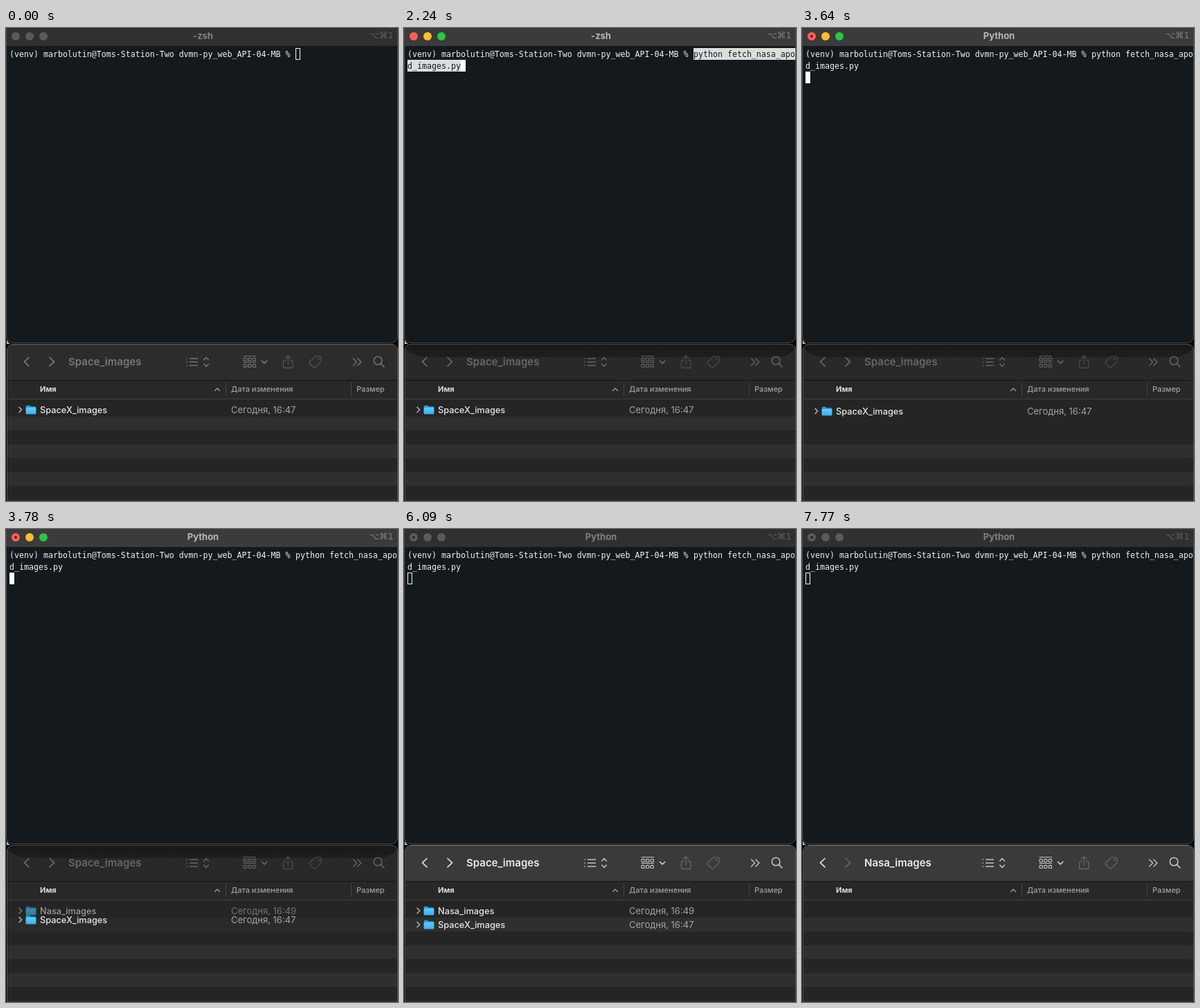
Animation of 566x684 px, one loop 8000 ms. Source, as an HTML page:

```html
<!DOCTYPE html>
<html lang="ru">
<head>
<meta charset="utf-8">
<title>Terminal and folder</title>
<style>
html, body { margin: 0; width: 100%; height: 100%; overflow: hidden; background: #050607; }
svg { display: block; width: 566px; height: 684px; }
text { font-family: Inter, "Open Sans", sans-serif; white-space: pre; }
.mono { font: 11.627px "DejaVu Sans Mono", monospace; fill: #f1f2f2; }
.keys { font: 12.5px "DejaVu Sans", sans-serif; }
.title { font-size: 13px; font-weight: 700; }
.folder { font-size: 15px; font-weight: 600; }
.head { font-size: 11px; font-weight: 500; fill: #a2a2a2; }
.name { font-size: 12.75px; font-weight: 500; fill: #e6e6e6; }
.date { font-size: 13px; font-weight: 400; fill: #a4a4a4; }
.line { fill: none; stroke-linecap: round; stroke-linejoin: round; }
</style>
</head>
<body>
<svg id="stage" viewBox="0 0 566 684">
  <defs>
    <linearGradient id="shade" x1="0" y1="0" x2="0" y2="1">
      <stop offset="0" stop-color="#111" stop-opacity=".75"/>
      <stop offset="1" stop-color="#181818" stop-opacity=".62"/>
    </linearGradient>
    <linearGradient id="blue" x1="0" y1="0" x2="0" y2="1">
      <stop offset="0" stop-color="#61cdfa"/>
      <stop offset="1" stop-color="#38aeee"/>
    </linearGradient>
    <clipPath id="termClip"><rect x="0" y="-20" width="566" height="476" rx="10"/></clipPath>
    <clipPath id="finderClip"><rect x="1" y="457" width="565" height="250" rx="10"/></clipPath>
    <g id="folderIcon">
      <path d="M28.7 547.2q0-1.5 1.5-1.5h3.6l1.5 1.5h6.5q1.5 0 1.5 1.5v8H28.7z" fill="#249bd9"/>
      <rect x="28.7" y="548.8" width="14.6" height="9.7" rx="1.2" fill="url(#blue)"/>
    </g>
  </defs>

  <path d="M1 451V457H6Q3 455 1 451Z" fill="#b8b8b8"/>
  <g clip-path="url(#termClip)">
    <rect width="566" height="456" fill="#14191e"/>
    <rect id="bar" width="566" height="26"/>
    <g id="lights">
      <circle cx="14" cy="12" r="6"/><circle cx="34" cy="12" r="6"/><circle cx="54" cy="12" r="6"/>
    </g>
    <circle id="busy" cx="14" cy="12" r="2"/>
    <text id="title" class="title" x="284.5" y="16.3" text-anchor="middle"></text>
    <text id="keys" class="keys" x="559.5" y="15" text-anchor="end">⌥⌘1</text>
    <g id="paste" fill="#dcdddd">
      <rect x="418" y="29" width="148" height="17"/><rect x="5" y="46" width="77" height="17"/>
    </g>
    <rect id="cursor" width="7" height="17"/>
    <text class="mono" x="5" y="42">(venv) marbolutin@Toms-Station-Two dvmn-py_web_API-04-MB % </text>
    <g id="command">
      <text class="mono" x="418" y="42">python fetch_nasa_apo</text>
      <text class="mono" x="5" y="59">d_images.py</text>
    </g>
  </g>
  <rect x=".5" y="-20" width="565" height="475.5" rx="10" fill="none" stroke="#454b4f"/>

  <g clip-path="url(#finderClip)">
    <rect x="1" y="457" width="565" height="227" fill="#252525"/>
    <rect id="toolbar" x="1" y="457" width="565" height="52"/>
    <path id="shadow" fill="url(#shade)" d="M1 457H566V460Q559 476 532 476H36Q10 476 1 460Z"/>
    <rect x="1" y="509" width="565" height="1" fill="#141414"/>
    <rect x="1" y="510" width="565" height="26" fill="#282828"/>
    <rect x="1" y="536" width="565" height="1" fill="#404040"/>
    <path d="M317.5 513v19M498.5 513v19" stroke="#454545"/>
    <text class="head" x="49" y="526" style="font-weight:700;fill:#dcdcdc">Имя</text>
    <text class="head" x="325" y="526">Дата изменения</text>
    <text class="head" x="506" y="526">Размер</text>
    <path class="line" d="M301.5 524.5l3.5-3.5 3.5 3.5" stroke="#a0a0a0" stroke-width="1.2"/>
    <g id="stripes" fill="#2f2f2f"></g>
    <rect id="picked" x="2" y="542" width="564" height="20" fill="#0058d0"/>
    <g id="rows"></g>

    <path id="back" class="line" d="M33 476.5l-6.5 6.2 6.5 6.2" stroke-width="1.7"/>
    <path id="forward" class="line" d="M63 476.5l6.5 6.2-6.5 6.2" stroke-width="1.7"/>
    <text id="place" class="folder" x="90" y="488"></text>
    <g id="tools" class="line" stroke-width="1.4">
      <path d="M265.5 478h11M265.5 483h11M265.5 488h11M261 478h.4M261 483h.4M261 488h.4"/>
      <path d="M285.7 480l3.3-3.5 3.3 3.5M285.7 486l3.3 3.5 3.3-3.5" stroke-width="1.6"/>
      <g id="grid" stroke-width="1.2"></g>
      <path d="M369.5 481.3l3.6 3.5 3.6-3.5" stroke-width="1.7"/>
      <path d="M501.5 478l5 5-5 5M507.8 478l5 5-5 5" stroke-width="1.4"/>
      <circle cx="537" cy="481" r="5.8" stroke-width="1.5"/>
      <path d="M541.3 485.3l4.5 4.7" stroke-width="1.7"/>
    </g>
    <g id="idleTools" class="line" stroke-width="1.3">
      <path d="M404 480.5h-2.2q-1.3 0-1.3 1.3v8.4q0 1.3 1.3 1.3h10.9q1.3 0 1.3-1.3v-8.4q0-1.3-1.3-1.3h-2.2M407.2 486v-12M403.8 477.2l3.4-3.4 3.4 3.4"/>
      <path d="M447.5 474.8h6q1.5 0 1.5 1.5v5.2q0 .8-.6 1.4l-7.9 7.8q-1.2 1.1-2.3 0l-5.8-5.7q-1.1-1.2 0-2.3l7.6-7.4q.6-.5 1.5-.5z"/>
      <circle cx="451.3" cy="478.6" r=".7"/>
    </g>
  </g>
  <path d="M1.5 684V467q0-9.5 9.5-9.5M556 457.5q9.5 0 9.5 9.5V684" fill="none" stroke="#565656"/>
  <path id="edge" d="M9 457.5H558" fill="none"/>
</svg>
<script>
const LOOP = 8000;
const $ = id => document.getElementById(id);
const set = (el, attrs) => { for (const k in attrs) el.setAttribute(k, attrs[k]); };
const show = (id, on) => set($(id), { visibility: on ? "visible" : "hidden" });

function add(parent, tag, attrs, text) {
  const el = document.createElementNS("http://www.w3.org/2000/svg", tag);
  set(el, attrs);
  if (text) el.textContent = text;
  return parent.appendChild(el);
}

function addRow(name, date) {
  const g = add($("rows"), "g", {});
  const chevron = add(g, "path", { class: "line", d: "M19 548.3l3.7 3.7-3.7 3.7", "stroke-width": 1.5 });
  add(g, "use", { href: "#folderIcon" });
  const label = add(g, "text", { class: "name", x: 49, y: 557 }, name);
  const when = add(g, "text", { class: "date", x: 325, y: 557 }, date);
  return { g, chevron, label, when };
}

// Stripes at every second row; the first one fades during the insertion.
const stripes = [0, 1, 2, 3].map(i =>
  add($("stripes"), "rect", { x: 2, y: 562 + i * 40, width: 564, height: 20 }));
const fresh = addRow("Nasa_images", "Сегодня, 16:49");
const older = addRow("SpaceX_images", "Сегодня, 16:47");

for (let r = 0; r < 2; r++) {
  const y = 474.5 + r * 9;
  add($("grid"), "path", { d: `M343 ${y}h17.5` });
  for (let c = 0; c < 3; c++)
    add($("grid"), "rect", { x: 343 + c * 6.6, y: y + 2.8, width: 4.2, height: 4.2, rx: 1 });
}

const idle = { bar: "#303030", title: "#808182", keys: "#5c5d5e", lights: ["#5a5a5a", "#5a5a5a", "#5a5a5a"] };
const active = { bar: "#3b3b3b", title: "#b6b7b7", keys: "#818282", lights: ["#fe5f57", "#febc2e", "#28c840"] };
const toolbars = {
  idle: { bg: "#2c2c2c", edge: "#6c6c6c", nav: "#7a7a7a", text: "#777777", tools: "#747474", off: "#535353" },
  shaded: { bg: "#292929", edge: "#4c4c4c", nav: "#696969", text: "#666666", tools: "#636363", off: "#474747" },
  active: { bg: "#3a3a3a", edge: "#858585", nav: "#dedede", text: "#ebebeb", tools: "#c4c4c4", off: "#636363" }
};

function drawTerminal(t, focused) {
  const look = focused ? active : idle;
  const pasted = t >= 2240, sent = t >= 3220, busy = t >= 3290;
  set($("bar"), { fill: look.bar });
  set($("title"), { fill: look.title });
  set($("keys"), { fill: look.keys });
  $("title").textContent = t < 3640 ? "-zsh" : "Python";
  [...$("lights").children].forEach((c, i) => set(c, { fill: look.lights[i] }));
  show("busy", busy);
  set($("busy"), { fill: focused ? "#7a0d0a" : "#292929" });

  show("command", pasted);
  show("paste", pasted && !sent);
  for (const line of $("command").children) line.style.fill = sent ? "" : "#14191e";

  const [x, y] = sent ? [5, 63] : pasted ? [82, 46] : [418, 29];
  set($("cursor"), focused
    ? { x, y, width: 7, height: 17, fill: "#fff", stroke: "none" }
    : { x: x + .5, y: y + .5, width: 6, height: 16, fill: "none", stroke: "#f4f4f4" });
}

function drawFinder(t, terminalFocused) {
  const look = toolbars[terminalFocused ? "shaded" : t < 980 ? "idle" : "active"];
  const opened = t >= 7630, cleared = t >= 7700;
  const picked = t >= 7490 && !cleared;
  set($("toolbar"), { fill: look.bg });
  set($("edge"), { stroke: look.edge });
  show("shadow", terminalFocused);
  set($("back"), { stroke: look.nav });
  set($("forward"), { stroke: opened ? "#636363" : look.nav });
  set($("place"), { fill: look.text });
  $("place").textContent = opened ? "Nasa_images" : "Space_images";
  set($("tools"), { stroke: look.tools });
  set($("idleTools"), { stroke: look.off });

  const step = Math.floor((t - 3640) / 70);
  const u = Math.max(0, Math.min(1, (step + 1) / 5));
  const slide = u * u * (3 - 2 * u);
  const appear = Math.max(0, (slide - .104) / .896);
  set(older.g, { transform: `translate(0 ${20 * slide})` });
  set(fresh.g, { opacity: appear });
  set(stripes[0], { opacity: step < 0 ? 1 : appear });
  show("rows", !cleared);
  show("picked", picked);
  for (const row of [fresh, older]) {
    const lit = picked && row === fresh;
    set(row.chevron, { stroke: lit ? "#fff" : "#b4b4b4" });
    row.label.style.fill = lit ? "#fff" : "";
    row.when.style.fill = lit ? "#c9dcf5" : "";
  }
}

function draw(t) {
  const focused = t >= 980 && t < 6090;
  drawTerminal(t, focused);
  drawFinder(t, focused);
}

const start = performance.now();
function tick() {
  draw((performance.now() - start) % LOOP);
  requestAnimationFrame(tick);
}
draw(0);
requestAnimationFrame(tick);
</script>
</body>
</html>
```
